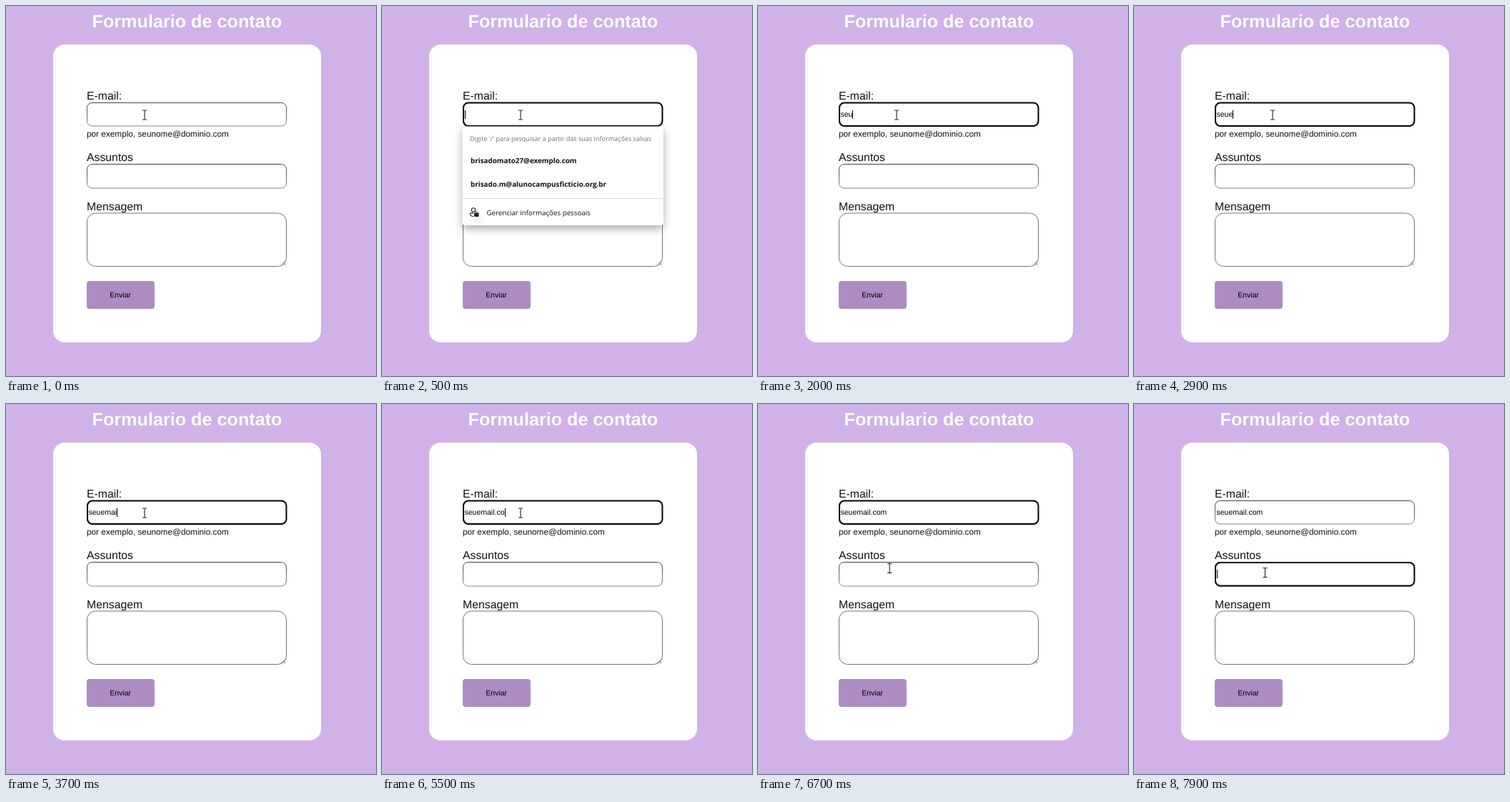
Recreate the animation shown at these times as an HTML page. Size 518 px wide and 518 px high, loop 8 s.

```html
<!DOCTYPE html>
<html lang="pt-BR">
<head>
<meta charset="utf-8">
<title>Formulario de contato</title>
<style>
  html, body { margin: 0; width: 100%; height: 100%; overflow: hidden; background: #d0b2e9; }
  svg { display: block; width: 100%; height: 100%; }
  text { font-family: "Liberation Sans", Arial, sans-serif; fill: #111; text-rendering: geometricPrecision; white-space: pre; }
  .title { font-size: 25.2px; font-weight: 700; fill: #fff; text-anchor: middle; }
  .label { font-size: 15.8px; }
  .hint { font-size: 11.8px; }
  .value { font-size: 10.5px; fill: #000; }
  .ui text { font-family: "Open Sans", "Noto Sans", sans-serif; font-size: 9.75px; }
  .ui .note { font-size: 9.05px; fill: #707070; }
  .ui .saved { font-size: 9.85px; font-weight: 700; }
  .ui .tip { font-size: 9.87px; fill: #444; }
  .field { fill: #fff; stroke: url(#inset); }
  .ring { fill: none; stroke: #000; stroke-width: 2; }
  .line { fill: none; stroke: #666; }
  #panel { transform-origin: 253px 238px; }
  #panel > rect { filter: drop-shadow(0 5px 6px rgba(0, 0, 0, .32)); }
</style>
</head>
<body>
<svg viewBox="0 0 518 518">
  <defs>
    <linearGradient id="inset" x2="0" y2="1">
      <stop offset=".1" stop-color="#444"/>
      <stop offset=".9" stop-color="#858585"/>
    </linearGradient>
  </defs>
  <rect width="518" height="518" fill="#d0b2e9"/>
  <text class="title" x="253.5" y="30">Formulario de contato</text>
  <rect x="66" y="54" width="375" height="417" rx="16" fill="#fff"/>

  <text class="label" x="113" y="130.5">E-mail:</text>
  <rect class="field" x="113.5" y="135.5" width="279" height="32.5" rx="7"/>
  <text class="hint" x="113" y="182.5">por exemplo, seunome@dominio.com</text>

  <text class="label" x="113" y="216.5">Assuntos</text>
  <rect class="field" x="113.5" y="221.5" width="279" height="33.5" rx="7"/>

  <text class="label" x="113" y="285.5">Mensagem</text>
  <rect x="113.5" y="290" width="279" height="74.5" rx="12" fill="#fff" stroke="#767676"/>
  <path class="line" d="M385 363.5l6.5-6.5M389 363.5l2.500-2.500"/>

  <rect x="113" y="385" width="95" height="39" rx="4" fill="#ab8dc3"/>
  <text class="value" x="145.300" y="408">Enviar</text>

  <rect class="ring" id="emailRing" x="114" y="135.500" width="278.500" height="32.500" rx="7"/>
  <rect class="ring" id="subjectRing" x="114" y="222" width="278.500" height="32.500" rx="7"/>
  <text class="value" id="email" x="115.500" y="155"></text>
  <rect id="caret" width="1" height="12"/>

  <g class="ui" id="panel">
    <rect x="112.500" y="168.500" width="281.500" height="138.500" rx="4" fill="#fff"/>
    <text class="note" x="123" y="188.500">Digite '/' para pesquisar a partir das suas informações salvas</text>
    <text class="saved" x="124" y="220">brisadomato27@exemplo.com</text>
    <text class="saved" x="124" y="253">brisado.m@alunocampusficticio.org.br</text>
    <path d="M112.500 269.500h281.500" stroke="#ddd"/>
    <g fill="none" stroke="#222" stroke-width="1.100">
      <circle cx="128" cy="285.500" r="2.700"/>
      <path d="M128 294.500c-3 0-4.500-1.200-4.500-3.800q0-.8.8-.8h4"/>
    </g>
    <rect x="129" y="289.500" width="6.500" height="5.500" rx="1" fill="#222"/>
    <path class="line" d="M130.800 289.500v-1.300h3v1.300" stroke-width="1"/>
    <text x="146.500" y="292.500">Gerenciar informações pessoais</text>
  </g>

  <g class="ui" id="tip">
    <rect x="201.500" y="165" width="360" height="20.500" fill="#fff" stroke="#444"/>
    <text class="tip" x="207" y="179">Inclua um "@" no endereço de email. "seuemail.com" não contém um "@".</text>
  </g>

  <path id="pointer" d="M-3-6.500h2.200q.8 0 .8.800q0-.8.8-.8h2.200M0-6v12M-3 6.500h2.200q.8 0 .8-.8q0 .8.8.8h2.200" fill="none" stroke="#222" stroke-width="1.100"/>
</svg>
<script>
  const LOOP = 8000;
  const ADDRESS = "seuemail.com";
  // Moment at which each character of the address appears
  const KEYS = [1500, 1800, 2000, 2800, 3000, 3300, 3700, 4000, 4200, 4500, 5500, 5600];
  const FADE = [[500, 1], [1700, .7], [1800, .3], [1900, .1], [2000, 0]];
  const SUBJECT_AT = 6900;

  const el = id => document.getElementById(id);
  const [email, caret, panel, tip, pointer, emailRing, subjectRing] =
    ["email", "caret", "panel", "tip", "pointer", "emailRing", "subjectRing"].map(el);

  const show = (node, on) => node.setAttribute("visibility", on ? "visible" : "hidden");
  const stepAt = (steps, t, first) => steps.reduce((value, [at, next]) => t >= at ? next : value, first);

  function pointerAt(t) {
    if (t < 6000) return [194, 152.5];
    const p = Math.min(1, Math.max(0, (t - 6200) / 600));
    const eased = p * p * (3 - 2 * p);
    return [193 - 9.5 * eased, 153.5 + 82.5 * eased];
  }

  function render(now) {
    const t = Math.floor(now % LOOP / 100) * 100;
    const inSubject = t >= SUBJECT_AT;
    const inEmail = t >= 500 && !inSubject;

    email.textContent = ADDRESS.slice(0, KEYS.filter(at => t >= at).length);
    show(emailRing, inEmail);
    show(subjectRing, inSubject);

    const blinkOn = Math.floor((t - SUBJECT_AT) / 500) % 2 === 0;
    show(caret, inSubject ? blinkOn : inEmail && t < 6000);
    caret.setAttribute("x", inSubject ? 116 : Math.round(115.5 + email.getComputedTextLength()));
    caret.setAttribute("y", inSubject ? 232 : 146);

    const opacity = stepAt(FADE, t, 0);
    panel.style.opacity = opacity;
    panel.style.transform = `scale(${opacity < 1 ? .985 : 1})`;

    show(tip, t >= 6200 && t < 6500);
    pointer.setAttribute("transform", `translate(${pointerAt(t)})`);
  }

  const start = performance.now();
  (function tick() {
    render(performance.now() - start);
    requestAnimationFrame(tick);
  })();
</script>
</body>
</html>
```
